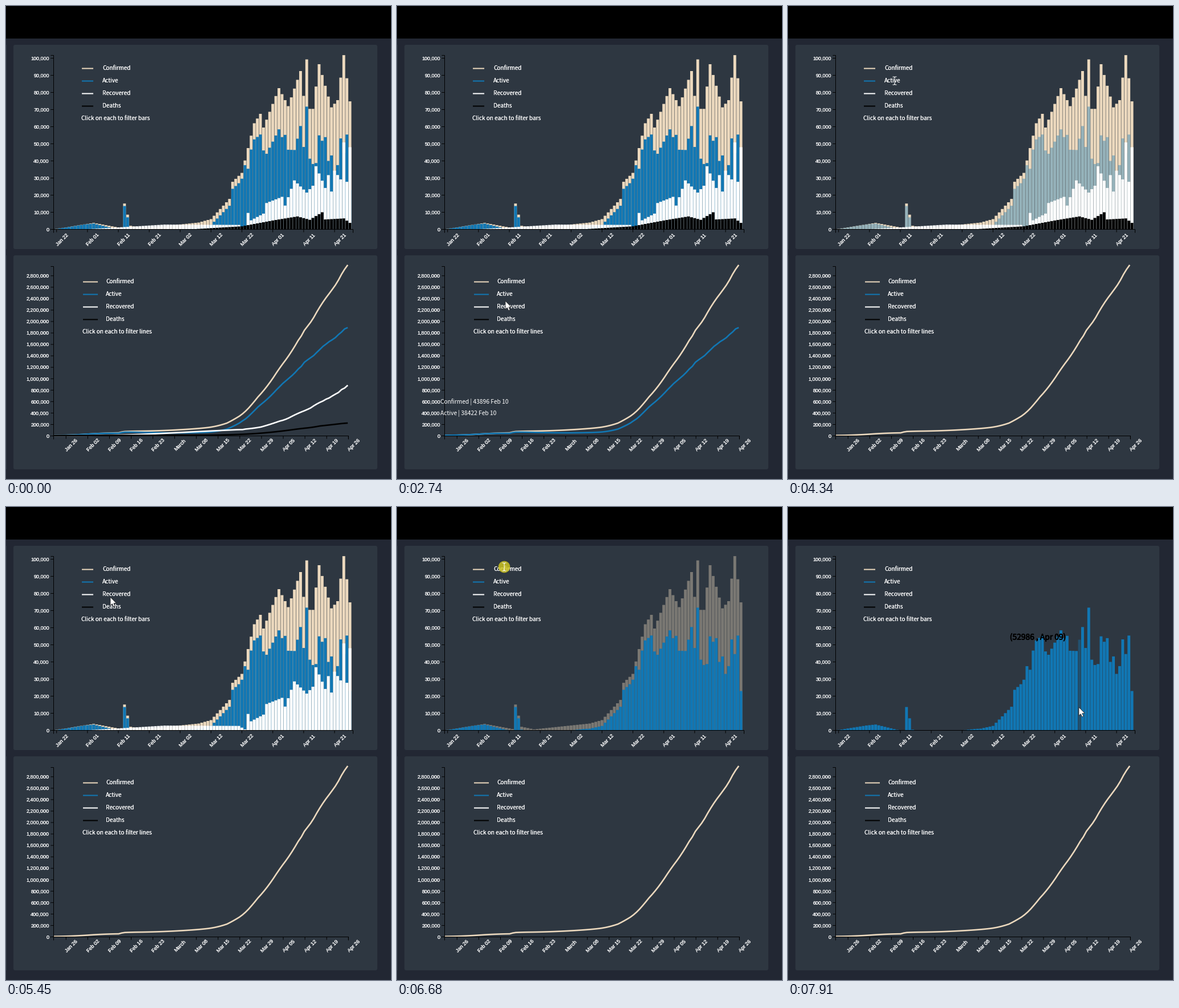
These frames come from a looping animation (675x829 px, 7.99 s). A matplotlib script:

```python
import matplotlib.patheffects as pe
import matplotlib.pyplot as plt
import numpy as np
from matplotlib.animation import FuncAnimation
from matplotlib.collections import LineCollection, PolyCollection
from matplotlib.colors import to_rgba
from matplotlib.patches import Circle, FancyBboxPatch, Polygon, Rectangle

W, H, DPI = 675, 829, 64
PT = 72 / DPI
FRAMES, STEP = 170, 47
PANEL, PAGE = "#2e3741", "#222733"
UI, SANS = "Noto Sans CJK JP", "Liberation Sans"

NAMES = ["Confirmed", "Active", "Recovered", "Deaths"]
COLORS = ["#ecd9be", "#1177b4", "#ffffff", "#000000"]
DAYS = np.arange(96)

BAR_X0, BAR_STEP, BAR_W, BAR_Y = 86.2, 5.415, 4.9, 391.5
LINE_X0, DAY_W, LINE_Y = 83.5, 5.44, 753.5


def trend(*points):
    """Daily counts in hundreds, straight between (day, count) turning points."""
    return np.interp(DAYS, *zip(*points))


confirmed = trend(
    (0, 3), (12, 38), (21, 8), (22, 151), (24, 21), (28, 6), (46, 40), (50, 60),
    (56, 178), (57, 278), (60, 330), (64, 620), (66, 675), (67, 595), (72, 825),
    (75, 720), (79, 925), (80, 780), (81, 993), (82, 704), (83, 704), (85, 965),
    (89, 713), (91, 755), (93, 1018), (95, 748))
recovered = trend(
    (9, 0), (26, 18), (35, 28), (59, 26), (61, 6), (62, 96), (63, 53), (67, 92),
    (68, 154), (73, 190), (74, 139), (77, 286), (81, 215), (83, 255), (84, 369),
    (87, 242), (88, 317), (89, 221), (90, 343), (92, 292), (93, 508), (94, 278),
    (95, 480))
deaths = trend(
    (44, 0.7), (60, 18), (70, 52), (78, 75.64), (82, 56), (86, 100), (87, 58),
    (93, 64), (95, 38))
daily = [confirmed, confirmed - recovered - deaths, recovered, deaths]


def running_total(day, on_feb_10):
    total = np.cumsum(day) * 100
    return total + on_feb_10 - total[19]


totals = [running_total(*pair) for pair in zip(daily, (43896, 38422, 4464, 1010))]


def date(i):
    day = i + 22
    for month, length in (("Jan", 31), ("Feb", 29), ("Mar", 31), ("Apr", 30)):
        if day <= length:
            return f"{month} {day:02d}"
        day -= length


fig = plt.figure(figsize=(W / DPI, H / DPI), dpi=DPI, facecolor=PAGE)
ax = fig.add_axes([0, 0, 1, 1])
ax.set_xlim(0, W)
ax.set_ylim(H, 0)
ax.axis("off")


def text(x, y, s, px, font=UI, color="white", **kw):
    return ax.text(x, y, s, fontsize=px * PT, family=font, color=color, **kw)


def label(*args, **kw):
    # Two passes give small type a firmer edge
    for _ in range(2):
        text(*args, zorder=6, **kw)


def segments(segs, color, px, z):
    coll = LineCollection(segs, colors=color, linewidths=px * PT, zorder=z)
    coll.set_snap(False)
    ax.add_collection(coll, autolim=False)


def panel(y0, y1):
    ax.add_patch(Rectangle((0, y0), 1, y1 - y0, fc=PANEL, lw=0))
    ax.add_patch(FancyBboxPatch((13, y0), 638, y1 - y0, fc=PANEL, lw=0,
                                boxstyle="round,pad=0,rounding_size=3"))


def axes_lines(top, base, right, yticks, xticks, text_dy):
    """yticks: (y, text) pairs; xticks: (x, text) pairs."""
    left = 83.5
    segs = [[(left, top), (left, base)], [(left, base), (right, base)],
            [(left - 5, top), (left, top)],
            [(left, base), (left, base + 6)], [(right, base), (right, base + 6)]]
    for y, s in yticks:
        segs.append([(left - 5, y), (left, y)])
        label(75.8, y + 3.1, s, 9, SANS, ha="right", va="baseline")
    for x, s in xticks:
        segs.append([(x, base), (x, base + 5)])
        label(x + 9.7, base + text_dy, s, 9, SANS, rotation=45, ha="center", va="center")
    segments(segs, "black", 1, 4)


def legend(x, baseline, length, text_x, hint):
    for k, (name, color) in enumerate(zip(NAMES, COLORS)):
        y = baseline + 22 * k
        segments([[(x, y - 2.5), (x + length, y - 2.5)]], color, 2, 6)
        label(text_x, y, name, 10)
    label(x - 0.5, baseline + 88, hint, 10)


ax.add_patch(Rectangle((0, 0), W, 57, fc="black", lw=0))
panel(68, 426)
panel(437, 812)

axes_lines(86.5, BAR_Y, 608.5,
           [(BAR_Y - 30 * k, f"{k * 10000:,}") for k in range(11)],
           [(88.7 + BAR_STEP * i, date(i)) for i in range(0, 96, 10)], 17.7)
axes_lines(456.5, LINE_Y, 600.5,
           [(LINE_Y - 20.05 * k, f"{k * 200000:,}") for k in range(15)],
           [(LINE_X0 + DAY_W * i, "March" if i == 39 else date(i))
            for i in range(4, 96, 7)], 15.7)
legend(133, 112, 20, 169.2, "Click on each to filter bars")
legend(135, 486, 26, 175.4, "Click on each to filter lines")

bars, lines = [], []
for k, (day, total, color) in enumerate(zip(daily, totals, COLORS)):
    polys = []
    for i, v in enumerate(day):
        x, y = BAR_X0 + BAR_STEP * i, BAR_Y - 0.3 * max(v, 0)
        polys.append([(x, BAR_Y), (x, y), (x + BAR_W, y), (x + BAR_W, BAR_Y)])
    coll = PolyCollection(polys, facecolors=color, linewidths=0, zorder=3 + k / 10)
    coll.set_snap(False)
    ax.add_collection(coll, autolim=False)
    bars.append(coll)
    lines += ax.plot(LINE_X0 + 5.428 * DAYS, LINE_Y - 0.8 - total * 0.0000999, color=color,
                     lw=2.6 * PT, solid_joinstyle="round", solid_capstyle="butt",
                     zorder=3 + k / 10)

rows = [text(75.5, 697.5 + 20 * k, "", 10.2, zorder=7) for k in range(4)]
bar_tip = text(0, 0, "", 13.8, color="black", zorder=7,
               path_effects=[pe.withStroke(linewidth=0.8 * PT, foreground="black")])

ARROW = np.array([(0, 0), (0, 14.5), (3.3, 11.6), (5.6, 16.8), (8, 15.8),
                  (5.8, 10.7), (10.3, 10.5)])
BEAM = np.array([(-3, -7), (-1, -7), (0, -6), (1, -7), (3, -7), (np.nan, np.nan),
                 (0, -6), (0, 6), (np.nan, np.nan),
                 (-3, 7), (-1, 7), (0, 6), (1, 7), (3, 7)])
ring = ax.add_patch(Circle((0, 0), 10.3, fc="#d6cc1e", alpha=0.8, lw=0, zorder=8))
arrow = ax.add_patch(Polygon(ARROW, fc="white", ec="#222222", lw=0.7 * PT, zorder=9))
beam, = ax.plot([], [], color="white", lw=1 * PT, zorder=9)

# Pointer stops: time, x, y
PATH = np.array([
    (300, 441, 740), (820, 196, 553), (1770, 196, 553), (1950, 191, 528),
    (2430, 191, 528), (2735, 190, 517), (2790, 190, 517), (2880, 188, 505),
    (3350, 188, 505), (3790, 205, 340), (4000, 205, 340), (4150, 187, 131),
    (4620, 187, 131), (4800, 187, 169), (5290, 187, 169), (5410, 183, 158),
    (5470, 183, 158), (5550, 187, 152), (6060, 187, 152), (6420, 188, 105),
    (7050, 188, 105), (7720, 553, 364), (7830, 549, 360), (7895, 549, 360),
    (7900, 510, 351)])
CLICKS = [900, 1990, 2880, 4120, 4480, 4830, 5560, 6600]
CLICK_MS = 150


def ramp(t, a, b):
    return float(np.clip((t - a) / (b - a), 0, 1))


def line_alphas(t):
    return [1, 1 - ramp(t, 2930, 3200), 1 - ramp(t, 2080, 2510), 1 - ramp(t, 940, 1320)]


def bar_alphas(t):
    return [1 - ramp(t, 6560, 6790),
            1 - ramp(t, 4190, 4450) + ramp(t, 4520, 4780),
            1 - ramp(t, 5600, 5830),
            1 - ramp(t, 4850, 5140)]


def over_text(x, y):
    top, left = (108, 170) if y < 430 else (482, 176)
    return left <= x <= left + 49 and any(abs(y - top - 22 * k) <= 5.5 for k in range(4))


def hovered_bar(t, x, y):
    i = int((x - BAR_X0) // BAR_STEP)
    if t > 7050 and 0 <= i < len(DAYS) and BAR_Y - 0.3 * daily[1][i] < y < BAR_Y:
        return i


def draw(n):
    t = n * STEP + STEP // 2
    x, y = (np.interp(t, PATH[:, 0], PATH[:, c]) for c in (1, 2))
    shown = t >= 300
    on_text = over_text(x, y)

    arrow.set_visible(shown and not on_text)
    arrow.set_xy(ARROW + (x, y))
    beam.set_visible(shown and on_text)
    beam.set_data(*(BEAM + (x, y)).T)
    ring.set_visible(any(0 <= t - c < CLICK_MS for c in CLICKS))
    ring.center = x, y

    day = int((x - LINE_X0) // DAY_W)
    tips = shown and not on_text and 455 < y < LINE_Y
    for name, line, row, total, a in zip(NAMES, lines, rows, totals, line_alphas(t)):
        line.set_alpha(a)
        row.set_text(f"{name} | {total[day]:.0f} {date(day)}" if tips and a > 0.5 else "")

    hover = hovered_bar(t, x, y)
    for k, (coll, a) in enumerate(zip(bars, bar_alphas(t))):
        rgba = np.tile(to_rgba(COLORS[k], a), (len(DAYS), 1))
        if k == 1 and hover is not None:
            rgba[hover, 3] = 0.4
        coll.set_facecolor(rgba)
    if hover is None:
        bar_tip.set_text("")
    else:
        value = daily[1][hover]
        bar_tip.set_text(f"({value * 100:.0f} , {date(hover)})")
        bar_tip.set_position((BAR_X0 + BAR_STEP * hover - 119.7, BAR_Y - 0.3 * value))


anim = FuncAnimation(fig, draw, frames=FRAMES, interval=STEP, repeat=True, repeat_delay=0)
plt.show()
```
